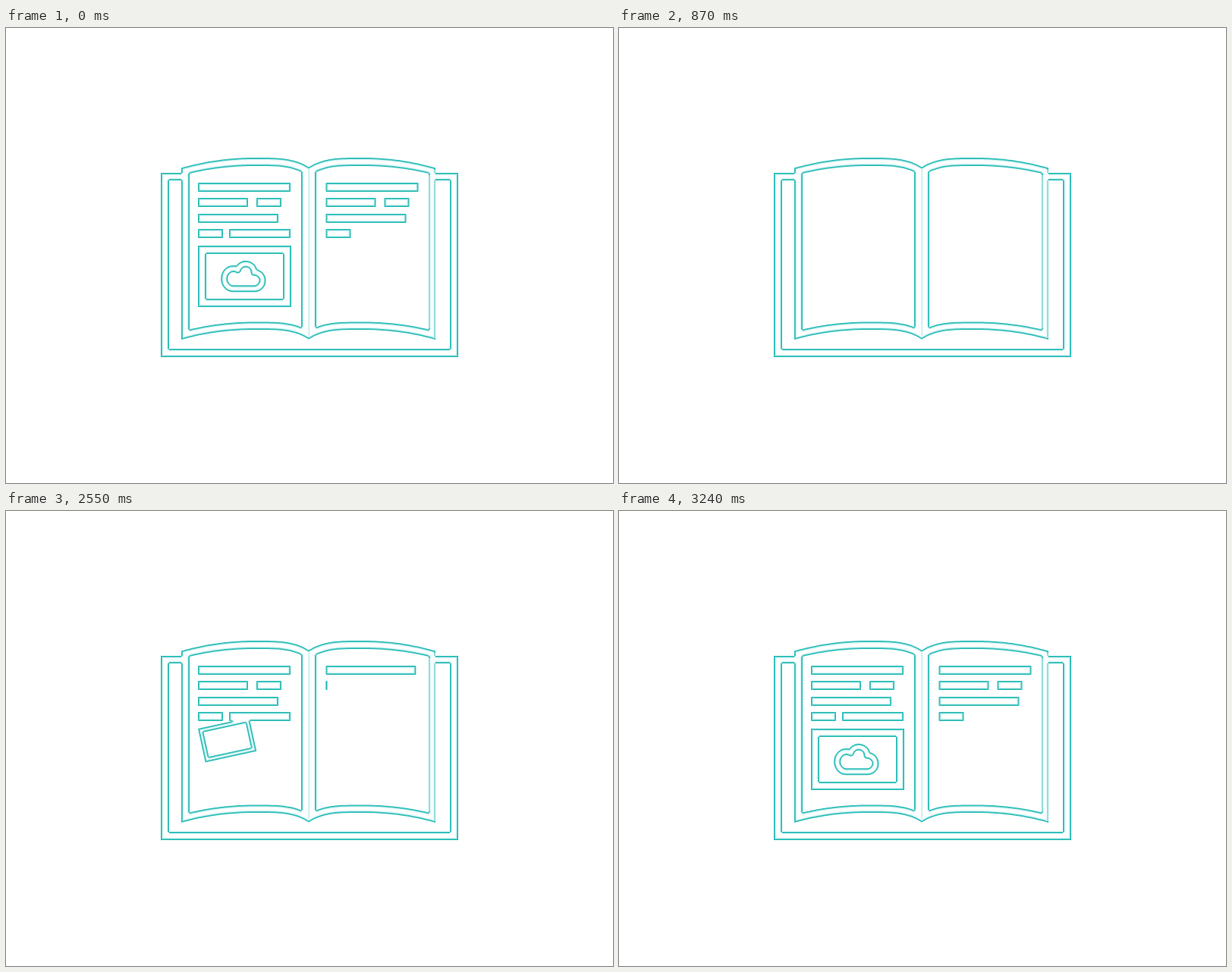
An HTML page with a canvas that plays this animation: 800 by 600 pixels, repeating every 4600 ms.

```html
<!DOCTYPE html>
<html lang="en">
<head>
<meta charset="utf-8">
<title>Open book</title>
<style>
html, body { margin: 0; width: 100%; height: 100%; overflow: hidden; background: #fff; }
canvas { display: block; }
</style>
</head>
<body>
<canvas id="stage" width="800" height="600"></canvas>
<script>
const LOOP = 4600, STEP = 30;
const TURN_START = 400, TURN_END = 870, SETTLED = 3240;
const SPINE = 399, PEAK = 70;
const AREA = { x: 195, y: 163, w: 410, h: 280 };
// colours from the rim of a shape inwards, one pixel each
const RIM = ['#22bab5', '#55cac6', '#d5f4f2', '#f2fcfc', '#ffffff'];

// text lines of a page: [offset, width] of each piece
const LINES = [
  [[0, 122]],
  [[0, 66], [77, 33]],
  [[0, 106]],
  [[0, 33], [41, 81]]
];

const stage = document.getElementById('stage').getContext('2d');
const layer = () => {
  const canvas = document.createElement('canvas');
  canvas.width = AREA.w;
  canvas.height = AREA.h;
  return canvas.getContext('2d');
};
const art = layer(), tint = layer();
const masks = [layer(), layer()];
let solids = [];

const clamp = v => Math.max(0, Math.min(1, v));
const smooth = v => v * v * (3 - 2 * v);

// damped spring from 0 to 1
function pop(t, start) {
  if (t <= start) return 0;
  if (t >= SETTLED) return 1;
  const x = (t - start) * .012;
  return 1 - Math.exp(-.75 * x) * Math.cos(x);
}

function copy(from, to, dx = 0, dy = 0) {
  to.drawImage(from.canvas, dx, dy);
}

function erode(from, to) {
  to.globalCompositeOperation = 'copy';
  copy(from, to);
  to.globalCompositeOperation = 'destination-in';
  for (const d of [-1, 1]) {
    copy(from, to, d, 0);
    copy(from, to, 0, d);
  }
}

// show the merged artwork as a hollow shape with a soft rim
function paintRim() {
  let mask = art;
  RIM.forEach((color, i) => {
    if (i) {
      const next = masks[i % 2];
      erode(mask, next);
      mask = next;
    }
    tint.globalCompositeOperation = 'copy';
    copy(mask, tint);
    tint.globalCompositeOperation = 'source-in';
    tint.fillStyle = color;
    tint.fillRect(0, 0, AREA.w, AREA.h);
    stage.drawImage(tint.canvas, AREA.x, AREA.y);
  });
}

function erase(path) {
  art.globalCompositeOperation = 'destination-out';
  art.fill(path);
  art.globalCompositeOperation = 'source-over';
}

// height of a page rim at distance u from the spine
function arch(u, a, b, [near, peak, far]) {
  return u < PEAK
    ? peak + (near - peak) * ((PEAK - u) / (PEAK - a)) ** 3.6
    : peak + (far - peak) * ((u - PEAK) / (b - PEAK)) ** 2.1;
}

function leaf(s, a, b, top, bottom) {
  const path = new Path2D(), n = 48;
  for (let i = 0; i <= 2 * n + 1; i++) {
    const back = i > n;
    const u = a + (b - a) * (back ? 2 * n + 1 - i : i) / n;
    path.lineTo(SPINE + u * s, arch(u, a, b, back ? bottom : top));
  }
  path.closePath();
  return path;
}

// s = 1 lies on the right, s = -1 on the left
function page(s) {
  const left = s < 0;
  const face = leaf(s, 0, left ? 168 : 167, [183.5, 171, 184.5], [410.5, 398, 411]);
  const ring = new Path2D(face);
  ring.addPath(leaf(s, 10, left ? 157 : 158, [190, 182, 192], [394.5, 387.5, 397.5]));
  return { face, ring };
}

function textLine(side, r, t) {
  const pieces = side || r < 3 ? LINES[r] : LINES[r];
  const shown = side && r === 3 ? pieces.slice(0, 1) : pieces;
  const start = side ? 2323 + 222 * r : 1483 + 208 * r;
  const span = 200 + 33 * shown.length;
  const total = shown.reduce((sum, [, w]) => sum + w, 0);
  let ink = total * clamp((t - start) / span);
  for (const [dx, full] of shown) {
    const w = Math.min(ink, full);
    if (w <= 0) return;
    const bar = [(side ? 421.5 : 253) + dx, 204 + Math.round(20.4 * r), w, 12];
    art.beginPath();
    art.roundRect(...bar, 1);
    art.fill();
    if (w < 10) solids.push(bar);
    ink -= w;
  }
}

function picture(t) {
  const s = pop(t, 2490);
  if (s > 0) {
    art.save();
    art.translate(253, 287);
    art.rotate((s - 1) * 28 * Math.PI / 180);
    art.scale(s, s);
    art.fill(frame, 'evenodd');
    art.restore();
  }
  const c = pop(t, 2820);
  if (c > 0) {
    art.save();
    art.translate(313, 328);
    art.scale(c, c);
    art.translate(-313, -328);
    art.lineWidth = 9;
    art.lineJoin = 'round';
    art.stroke(cloud);
    art.restore();
  }
}

function ring(x, y, w, h, band, topBand = band) {
  const path = new Path2D();
  path.rect(x, y, w, h);
  path.rect(x + band, y + topBand, w - 2 * band, h - band - topBand);
  return path;
}

const cover = ring(204, 191, 392, 243, 11, 10);
const frame = ring(0, 0, 123, 81, 11);
const cloud = new Path2D('M299.5 343.8A11.8 13.1 0 0 1 299.5 317.5Q303 317 305.5 319' +
  'A11 11 0 0 1 327 322.2A10.8 10.8 0 0 1 327.5 343.8Z');
const pages = [page(-1), page(1)];

function drawArt(t) {
  const turning = t > TURN_START && t < TURN_END;
  const contentTime = t < TURN_END ? LOOP : t;
  art.setTransform(1, 0, 0, 1, 0, 0);
  art.clearRect(0, 0, AREA.w, AREA.h);
  art.translate(-AREA.x, -AREA.y);
  art.fill(cover, 'evenodd');
  pages.forEach(p => erase(p.face));

  for (let r = 0; r < LINES.length; r++) {
    textLine(0, r, contentTime);
    if (!turning) textLine(1, r, contentTime);
  }
  picture(contentTime);

  if (turning) {
    const p = smooth((t - TURN_START) / (TURN_END - TURN_START));
    const turned = page(1 - 2 * p);
    erase(turned.face);
    art.fill(turned.ring, 'evenodd');
  }
  pages.forEach(p => art.fill(p.ring, 'evenodd'));
}

function draw(t) {
  solids = [];
  drawArt(t);
  stage.fillStyle = '#fff';
  stage.fillRect(0, 0, 800, 600);
  paintRim();

  stage.fillStyle = 'rgba(34,186,181,.6)';
  solids.forEach(bar => stage.fillRect(...bar));
  // paler verticals: right page edge and spine
  stage.fillStyle = 'rgba(255,255,255,.45)';
  stage.fillRect(557, 194, 3, 202);
  stage.fillRect(563, 187, 3, 222);
  stage.fillStyle = '#bfeeeb';
  stage.fillRect(398.5, 186, 1.5, 220);
}

const begin = performance.now();
let last = -1;
function tick() {
  const t = Math.floor((performance.now() - begin) % LOOP / STEP) * STEP;
  if (t !== last) draw(t);
  last = t;
  requestAnimationFrame(tick);
}
tick();
</script>
</body>
</html>
```
